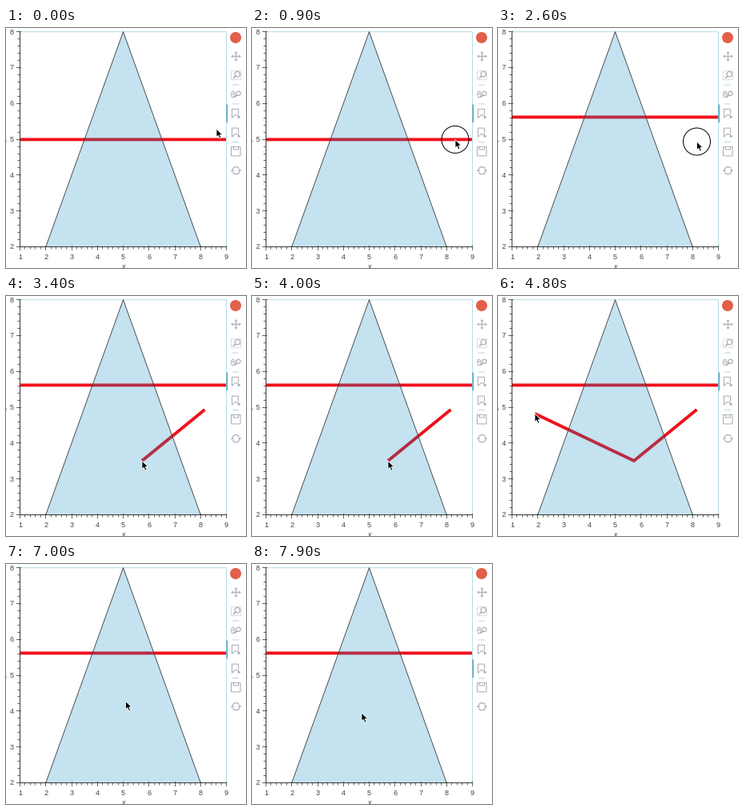
Recreate the animation shown at these times as a matplotlib script. Size 300 px wide and 300 px high, loop 8 s.

```python
import math

import matplotlib.pyplot as plt
from matplotlib.animation import FuncAnimation
from matplotlib.patches import Circle, Ellipse, Polygon, Rectangle

SIZE, DPI = 300, 100
STEP, FRAMES = 100, 80
PX = 72 / DPI  # points per pixel

INK, GREY, PALE = "#3a3a3a", "#a8adb0", "#b4dbe6"
BLUE, RED = "#4fa5c4", "#f0101c"
FILL = (0.035, 0.53, 0.76, 0.24)

fig = plt.figure(figsize=(SIZE / DPI, SIZE / DPI), dpi=DPI, facecolor="white")
ax = fig.add_axes([0, 0, 1, 1])
ax.set_xlim(0, SIZE)
ax.set_ylim(SIZE, 0)
ax.axis("off")


def sx(x):
    return 17.5 + (x - 1) * 32.25


def sy(y):
    return 273.5 - (y - 2) * 44.8


LEFT, RIGHT, TOP, BOTTOM = sx(1), sx(9), sy(8), sy(2)


def line(pts, color=INK, width=1.0, z=3, **kw):
    xs, ys = zip(*pts)
    return ax.plot(xs, ys, color=color, lw=width * PX, zorder=z, snap=False,
                   solid_capstyle="butt", **kw)[0]


def shape(patch, fc="none", ec="none", width=1.0, z=3, **kw):
    patch.set(facecolor=fc, edgecolor=ec, linewidth=width * PX, zorder=z,
              snap=False, **kw)
    return ax.add_patch(patch)


def label(x, y, text, **kw):
    ax.text(x, y, text, family="Liberation Sans", fontsize=9.1 * PX,
            color="#444444", va="baseline", zorder=5, **kw)


def tick(pos, major, vertical):
    """Short mark across an axis, longer for whole units."""
    inner, outer = (1.5, 4.5) if major else (0, 3)
    pos = math.floor(pos) + 0.5
    if vertical:
        pts = [(pos, BOTTOM - inner), (pos, BOTTOM + outer)]
    else:
        pts = [(LEFT + inner, pos), (LEFT - outer, pos)]
    line(pts, INK, 0.8, 4)


def draw_plot():
    peak = [(sx(2), BOTTOM), (sx(5), TOP), (sx(8), BOTTOM)]
    line([(LEFT, TOP), (RIGHT, TOP), (RIGHT, BOTTOM)], PALE, z=1)
    shape(Polygon(peak), FILL)
    line(peak, INK, 0.85, 3.1)
    line([(LEFT, TOP), (LEFT, BOTTOM), (RIGHT, BOTTOM)], INK, 1, 4)
    for i in range(41):
        tick(sx(1 + i / 5), i % 5 == 0, True)
    for i in range(31):
        tick(sy(2 + i / 5), i % 5 == 0, False)
    for n in range(1, 10):
        label(sx(n), 289, str(n), ha="center")
    for n in range(2, 9):
        label(9.4, sy(n) + 3, str(n), ha="right")
    label(147, 301, "x", ha="center", style="italic")
    label(0.6, 139.5, "y", ha="center", style="italic", rotation=90,
          rotation_mode="anchor")


# Toolbar
ICON_X = 287.5


def icon_y(i):
    return 35.4 + 23.8 * i


def lens(x, y, r):
    shape(Circle((x, y), r), "white", GREY, 1.2, 5)
    d = r * 0.7
    line([(x - d, y + d), (x - d - 3, y + d + 3)], GREY, 1.6, 5)


def pan_icon(x, y):
    for k in range(4):
        c, s = round(math.cos(k * math.pi / 2)), round(math.sin(k * math.pi / 2))
        bx, by = x + 3.8 * c, y + 3.8 * s
        line([(x, y), (bx, by)], GREY, 1.1)
        shape(Polygon([(x + 6.3 * c, y + 6.3 * s), (bx - 2.2 * s, by + 2.2 * c),
                       (bx + 2.2 * s, by - 2.2 * c)]), GREY)


def box_zoom_icon(x, y):
    shape(Rectangle((x - 6, y - 5.5), 12, 11), ec=GREY, width=0.8,
          linestyle=(0, (1.6, 1.6)))
    lens(x + 1.8, y - 1.5, 3.2)


def wheel_zoom_icon(x, y):
    shape(Ellipse((x - 3.7, y), 4.4, 7.5), ec=GREY)
    line([(x - 3.7, y - 2), (x - 3.7, y + 1)], GREY)
    lens(x + 3, y - 1.2, 2.6)


def poly_icon(x, y):
    line([(x + 3, y + 1), (x + 3, y - 5.5), (x - 5, y - 5.5), (x - 5, y + 5.5),
          (x - 0.5, y + 1.5), (x + 3, y + 3)], GREY)
    shape(Polygon([(x + 2, y + 1.5), (x + 6, y + 5), (x + 2.4, y + 6.5)]), GREY)


def save_icon(x, y):
    shape(Rectangle((x - 6, y - 6), 11.5, 11.5), ec=GREY)
    line([(x - 3, y - 6), (x - 3, y - 2.5), (x + 3, y - 2.5), (x + 3, y - 6)],
         GREY)


def reset_icon(x, y):
    for s in (1, -1):
        turn = [math.radians(200 + 12 * k) for k in range(12)]
        line([(x + 4.6 * s * math.cos(a), y + 4.6 * s * math.sin(a))
              for a in turn], GREY, 1.2)
        shape(Polygon([(x + 2.2 * s, y - s), (x + 6.6 * s, y - s),
                       (x + 4.6 * s, y + 1.8 * s)]), GREY)


def draw_toolbar():
    shape(Circle((287, 12), 7), "#e2604a")
    icons = (pan_icon, box_zoom_icon, wheel_zoom_icon, poly_icon, poly_icon,
             save_icon, reset_icon)
    for i, draw in enumerate(icons):
        draw(ICON_X, icon_y(i))
    for i in (1, 2, 4):
        y = icon_y(i + 0.5)
        line([(283, y), (291, y)], PALE)


# Pointer stops: arrival time in ms, place, whether it clicks there
GRAB, DROP = (254, 139.4), (252.3, 111.4)
START, CORNER, END = (248.5, 142), (170, 206), (46, 147)
STOPS = [
    (0, (263, 126), False), (500, GRAB, False), (1450, DROP, False),
    (2400, START, True), (3400, CORNER, True), (4500, END, True),
    (5700, (58, 152), False), (6300, (115, 170), False),
    (6600, (117, 181), True), (7400, (ICON_X, icon_y(4)), True),
    (7900, (137, 186), False),
]
T_GRAB, T_DROP, T_START, T_CORNER, T_END = (s[0] for s in STOPS[1:6])
T_DELETE, T_SWITCH = 7000, 7500
PRESS = 200


def pointer(t):
    """Rest at each stop, then ease to the next so as to arrive on time."""
    for (t0, a, _), (t1, b, _) in zip(STOPS, STOPS[1:]):
        if t <= t1:
            travel = min(t1 - t0, 200 + 2 * math.dist(a, b))
            u = max(0, 1 - (t1 - t) / travel)
            u = u * u * (3 - 2 * u)
            return a[0] + u * (b[0] - a[0]), a[1] + u * (b[1] - a[1])
    return STOPS[-1][1]


def pressed(t):
    dragging = T_GRAB + PRESS <= t <= T_DROP + PRESS / 2
    return dragging or any(click and at < t <= at + PRESS
                           for at, _, click in STOPS)


def poly_points(t, pos):
    if t <= T_START + PRESS or t >= T_DELETE:
        return []
    done = [START] + [CORNER] * (t > T_CORNER)
    return done + [pos if t <= T_END else END]


ARROW = [(0, 0), (0, 10.4), (2.3, 8.3), (4, 12.2), (5.9, 11.4), (4.2, 7.6),
         (7.4, 7.4)]

draw_plot()
draw_toolbar()
bar = line([(LEFT, 0), (RIGHT - 0.5, 0)], RED, 3.9, 2)
poly = line([START, END], RED, 3.9, 2, solid_joinstyle="miter")
active = line([(276.3, 0), (276.3, 0)], BLUE, 1.5, 4)
ring = shape(Circle((0, 0), 17), ec="black", z=8)
arrow = shape(Polygon(ARROW), "black", "white", 0.8, 9)


def update(frame):
    t = frame * STEP
    x, y = pointer(t)
    bar_y = y if T_GRAB <= t <= T_DROP else (GRAB if t < T_GRAB else DROP)[1]
    bar.set_ydata([bar_y, bar_y])
    pts = poly_points(t, (x, y))
    poly.set_data([p[0] for p in pts], [p[1] for p in pts])
    mid = icon_y(4 if t >= T_SWITCH else 3)
    active.set_ydata([mid - 11.3, mid + 11.3])
    ring.center = (x, y)
    ring.set_visible(pressed(t))
    arrow.set_xy([(x + dx, y + dy) for dx, dy in ARROW])
    return bar, poly, active, ring, arrow


anim = FuncAnimation(fig, update, frames=FRAMES, interval=STEP, repeat=True,
                     repeat_delay=0, blit=False)
plt.show()
```
